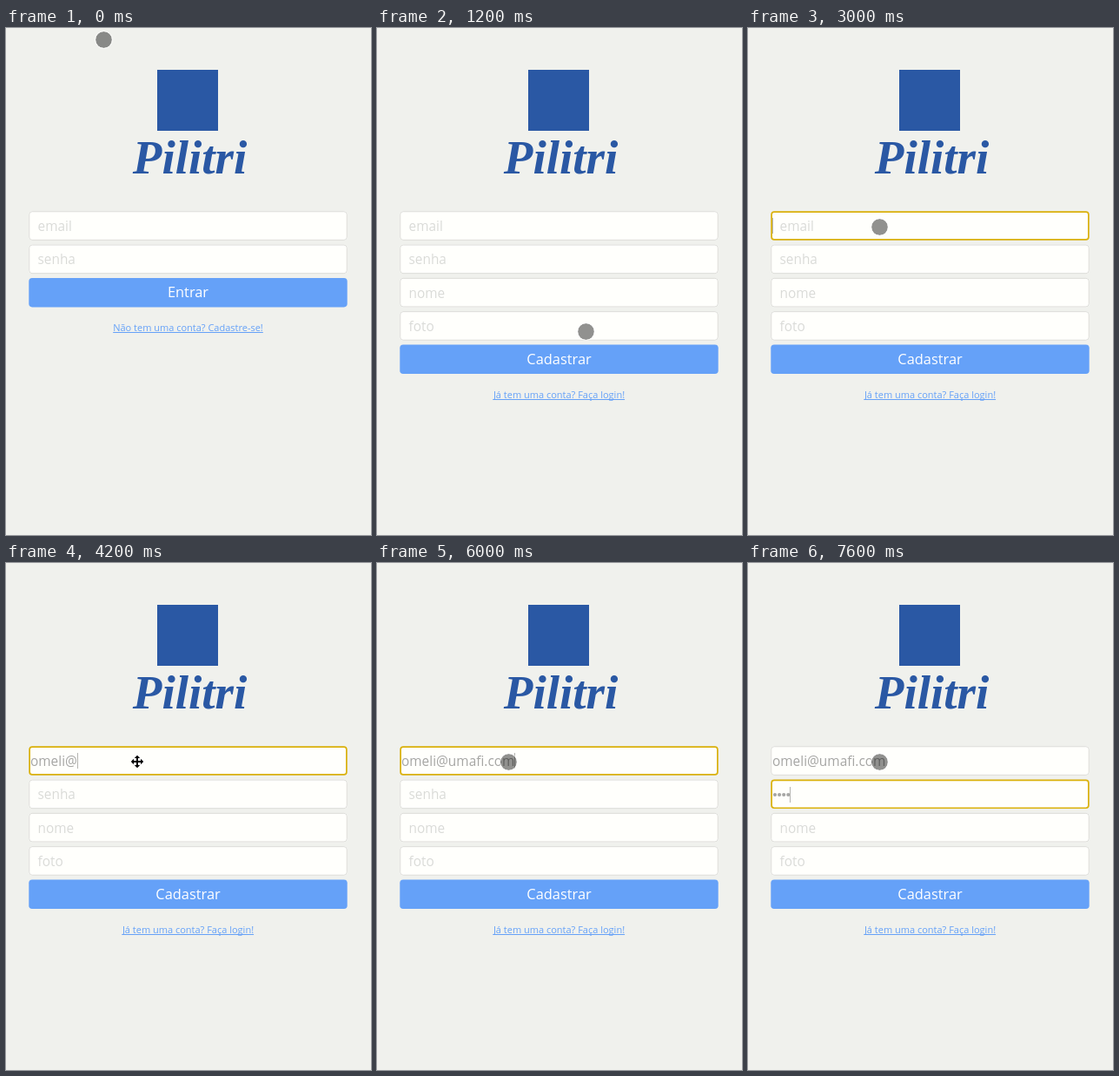
These frames come from a looping animation (420 by 582 pixels, 8000 ms). An HTML page with a canvas:

```html
<!DOCTYPE html>
<html lang="pt">
<head>
<meta charset="utf-8">
<title>Cadastro</title>
<style>
  html, body { margin: 0; width: 100%; height: 100%; overflow: hidden; background: #f0f1ed; }
  canvas { display: block; }
</style>
</head>
<body>
<canvas id="stage" width="420" height="582"></canvas>
<script>
const ctx = document.getElementById('stage').getContext('2d');
const LOOP = 8000, STEP = 100;
const SANS = '"Open Sans", "Noto Sans", sans-serif';
const FIELD = { x: 26.3, top: 210.3, w: 366.4, h: 33.5, pitch: 38.3, radius: 3.8 };
const CENTER = 209.5;
const PAGE = '#f0f1ed', BLUE = '#65a1f8', BRAND = '#2a58a4', INK = '#a6a6a4';
const ADDRESS = 'omeli@umafi.com';

// moments in ms
const SIGNUP = 1200, EMAIL = 3000, DOMAIN = 4200, PASSWORD = 6300;

// pointer glides: start, end, x, y
const GLIDES = [
  [0, STEP, 249.5, 224.5],
  [300, 400, 278, 296],
  [400, 500, 257.5, 340.5],
  [600, 700, 240.5, 348.5],
  [1600, 1700, 235.5, 343.5],
  [1800, 2100, 151.5, 228.5]
];

const clamp = (v, lo, hi) => Math.min(hi, Math.max(lo, v));
const rowTop = row => FIELD.top + row * FIELD.pitch;

// characters entered by time t, one per interval, the first at start
const keys = (t, start, interval, max) => clamp(Math.floor((t - start) / interval) + 1, 0, max);

// the local part is typed faster than the rest of the address
const typedCount = t => keys(t, EMAIL + STEP, 150, 5) + keys(t, DOMAIN, 200, 10);
const hiddenCount = t => keys(t, 6800, 250, 4);

function pointerAt(t) {
  let x = 112.5, y = 13.5;
  for (const [start, end, toX, toY] of GLIDES) {
    const p = clamp((t - start) / (end - start), 0, 1);
    x += (toX - x) * p;
    y += (toY - y) * p;
  }
  return [x, y];
}

function text(str, x, y, size, color, align = 'left', font = SANS, style = '500') {
  ctx.font = `${style} ${size}px ${font}`;
  ctx.textAlign = align;
  ctx.fillStyle = color;
  ctx.fillText(str, x, y);
  return ctx.measureText(str).width;
}

function rowPath(row, inset = 0) {
  const { x, w, h, radius } = FIELD;
  ctx.beginPath();
  ctx.roundRect(x + inset, rowTop(row) + inset, w - 2 * inset, h - 2 * inset, radius - inset);
}

function outline(row, width, color) {
  rowPath(row, width / 2);
  ctx.lineWidth = width;
  ctx.strokeStyle = color;
  ctx.stroke();
}

function field(row, label, focused) {
  rowPath(row);
  ctx.fillStyle = '#fffffc';
  ctx.fill();
  outline(row, 0.9, '#d8d9d5');
  if (focused) outline(row, 1.7, '#dbb20c');
  text(label, 36.5, rowTop(row) + 22.7, 15.4, '#dadbd8');
}

function caret(x, row) {
  ctx.fillStyle = '#b4b4b0';
  ctx.fillRect(Math.round(x), Math.round(rowTop(row) + 8), 1, 18);
}

function button(row, label) {
  rowPath(row);
  ctx.fillStyle = BLUE;
  ctx.fill();
  text(label, CENTER, rowTop(row) + 22.3, 16.4, '#fff', 'center');
}

function link(label, row) {
  const y = rowTop(row) + 23;
  const w = text(label, CENTER, y, 11, BLUE, 'center');
  ctx.fillRect(CENTER - w / 2, Math.round(y) + 1, w, 1);
}

function dot(x, y, r, color) {
  ctx.beginPath();
  ctx.arc(x, y, r, 0, 2 * Math.PI);
  ctx.fillStyle = color;
  ctx.fill();
}

function brand() {
  ctx.fillStyle = BRAND;
  ctx.fillRect(174, 48, 70, 70);
  text('Pilitri', 211.5, 167, 55, BRAND, 'center', '"Liberation Serif", serif', 'italic bold');
}

function disc(x, y) {
  dot(x, y, 9.4, 'rgba(0,0,0,.43)');
  ctx.lineWidth = 1;
  ctx.strokeStyle = 'rgba(255,255,255,.75)';
  ctx.beginPath();
  ctx.arc(x, y, 9.9, 0, 2 * Math.PI);
  ctx.stroke();
}

function moveArrows(x, y) {
  const arrow = new Path2D('M-1 0V-4H-3.2L0 -7.2L3.2 -4H1V0Z');
  const eachArm = paint => {
    for (let i = 0; i < 4; i++) {
      paint();
      ctx.rotate(Math.PI / 2);
    }
  };
  ctx.save();
  ctx.translate(x, y);
  ctx.lineWidth = 1.6;
  ctx.strokeStyle = '#fff';
  ctx.fillStyle = '#000';
  eachArm(() => ctx.stroke(arrow));
  eachArm(() => ctx.fill(arrow));
  ctx.restore();
}

function loginForm() {
  field(0, 'email');
  field(1, 'senha');
  button(2, 'Entrar');
  link('Não tem uma conta? Cadastre-se!', 3);
}

function signupForm(t) {
  const typed = typedCount(t), hidden = hiddenCount(t);
  const onPassword = t >= PASSWORD, onEmail = t >= EMAIL && !onPassword;
  const left = 28, gap = 5.1;

  field(0, typed ? '' : 'email', onEmail);
  const w = text(ADDRESS.slice(0, typed), left, rowTop(0) + 22.7, 15.4, INK);
  if (onEmail) caret(left + w, 0);

  field(1, hidden ? '' : 'senha', onPassword);
  for (let i = 0; i < hidden; i++) dot(left + 3 + i * gap, rowTop(1) + 17.4, 2.1, INK);
  if (onPassword) caret(left + hidden * gap, 1);

  field(2, 'nome');
  field(3, 'foto');
  button(4, 'Cadastrar');
  link('Já tem uma conta? Faça login!', 5);
}

function draw(t) {
  ctx.fillStyle = PAGE;
  ctx.fillRect(0, 0, 420, 582);
  brand();
  if (t < SIGNUP) loginForm();
  else signupForm(t);
  const [x, y] = pointerAt(t);
  if (t >= DOMAIN && t < DOMAIN + 200) moveArrows(x - 0.5, y - 0.5);
  else disc(x, y);
}

const begin = performance.now();
function tick() {
  const t = (performance.now() - begin) % LOOP;
  draw(Math.floor(t / STEP) * STEP);
  requestAnimationFrame(tick);
}
tick();
</script>
</body>
</html>
```
